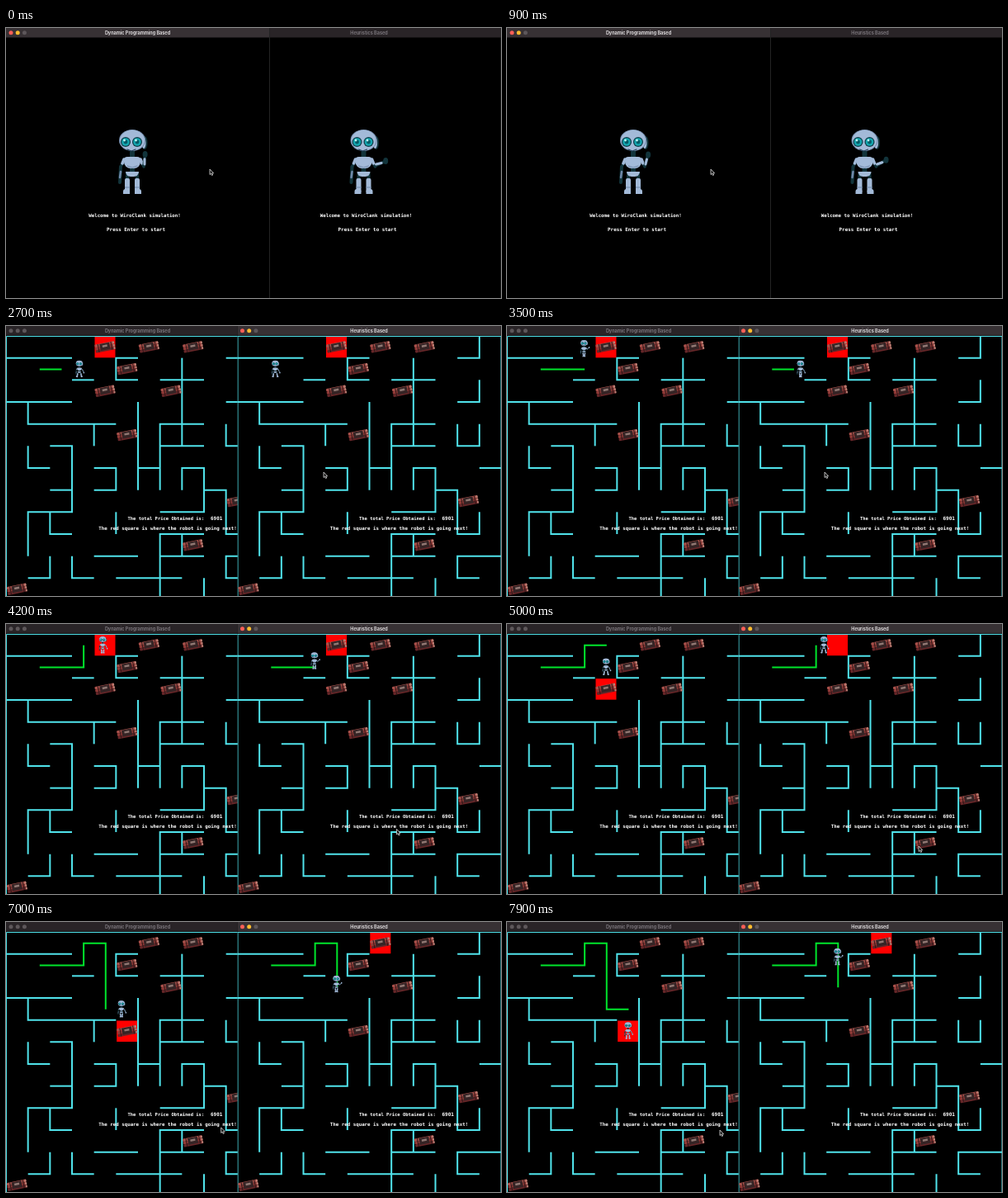
These frames come from a looping animation (600x327 px, 8000 ms). An HTML page with a canvas:

```html
<!DOCTYPE html>
<html lang="en">
<head>
<meta charset="utf-8">
<title>Maze robots</title>
<style>
html, body { margin: 0; width: 100%; height: 100%; overflow: hidden; background: #000 }
canvas { display: block }
</style>
</head>
<body>
<canvas id="stage" width="600" height="327"></canvas>
<script>
const c = document.getElementById('stage').getContext('2d');
const LOOP = 8000, CELL = 80 / 3, TOP = 12, FOCUS = 2300;
const MONO = '"DejaVu Sans Mono", monospace';
const STEP = { R: [1, 0], L: [-1, 0], D: [0, 1], U: [0, -1] };

// Walls as a start corner and the turns taken from it
const walls = `0,1 RRR; 0,3 RRR; 1,3 DRRRR; 4,4 D; 6,1 LDR; 3,2 R; 8,1 DDDD; 7,2 RR;
  10,1 RU; 10,3 RU; 10,4 DRU; 6,3 DDDD; 9,4 LLDDD; 6,6 R; 7,5 RR; 2,5 RDDDLLDD;
  2,7 R; 1,5 DR; 4,6 RDL; 8,7 URDDLL; 9,7 RDDRU; 11,6 R; 5,8 D; 2,8 DR; 9,9 LLDDD;
  8,9 D; 4,10 RR; 7,10 RR; 1,11 RU; 3,10 DR; 5,11 RRR; 9,11 D; 12,10 LLDR`.split(';').map(walk);
const bombs = '4,0 6,0 8,0 5,1 4,2 7,2 5,4 10,7 8,9 0,11'.split(' ');

const bots = [
  { x: 0, title: 'Dynamic Programming Based', start: 1688, wave: .55, route: walk('1,1 RRURDDDRD') },
  { x: 280.5, title: 'Heuristics Based', start: 2540, wave: 0, route: walk('1,1 RRURDDUURR') }
];
for (const b of bots) {
  const visits = b.route.map(String);
  b.stops = visits.map((_, i) => i)
    .filter(i => bombs.includes(visits[i]) && visits.indexOf(visits[i]) === i);
}
const pointer = [[0, 247, 171], [1950, 385, 177], [3750, 499, 269], [5150, 301, 203], [6450, 258, 252]];

const mid = n => (n + .5) * CELL;
const mix = (a, b, f) => a + (b - a) * f;
const clamp = (v, lo, hi) => Math.min(hi, Math.max(lo, v));

function walk(s) {
  const [start, moves] = s.trim().split(' ');
  const path = [start.split(',').map(Number)];
  for (const m of moves) path.push(path.at(-1).map((v, i) => v + STEP[m][i]));
  return path;
}

// Cells travelled; a bot runs faster while it is the only one
function progress(b, t) {
  const alone = Math.max(0, Math.min(t, bots[1].start) - b.start);
  return clamp((1.375 * (t - b.start) + .515 * alone) / 1000, 0, b.route.length - 1.001);
}

function line(color, width, points) {
  c.strokeStyle = color;
  c.lineWidth = width;
  c.beginPath();
  for (const [x, y] of points) c.lineTo(x, y);
  c.stroke();
}

function oval(color, x, y, rx, ry = rx) {
  c.fillStyle = color;
  c.beginPath();
  c.ellipse(x, y, rx, ry, 0, 0, 7);
  c.fill();
}

function box(color, x, y, w, h, r = 0) {
  c.fillStyle = color;
  c.beginPath();
  c.roundRect(x, y, w, h, r);
  c.fill();
}

function text(s, x, y, size, align = 'center', color = '#fff', family = MONO) {
  c.font = `bold ${size}px ${family}`;
  c.fillStyle = color;
  c.textAlign = align;
  c.fillText(s, x, y);
}

function robot(x, y, scale, angle, stride = 0) {
  const skin = '#a3bad8', shade = '#7089aa', dark = '#12343b';
  c.save();
  c.translate(x, y);
  c.scale(scale, scale);
  c.lineCap = c.lineJoin = 'round';
  for (const side of [-1, 1]) {
    c.save();
    c.translate(side * 6, 14);
    c.rotate(side * stride);
    line(dark, 4, [[0, 0], [0, 10]]);
    box(skin, -3, 6, 6, 18, 2);
    box(skin, -4 + side, 19, 8, 6, [3, 3, 0, 0]);
    line(shade, 1, [[-3, 17], [3, 17]]);
    c.restore();
    line(dark, 3.5, [[side * 9, -3], [side * 14, 6]]);
    line(skin, 3.5, [[side * 10, -3], [side * 12, 2]]);
  }
  line(dark, 4, [[-14, 6], [-15, 25]]);
  line(shade, 2.5, [[-14, 12], [-15, 19]]);
  const hx = 14 + 14 * Math.sin(angle), hy = 5 - 14 * Math.cos(angle);
  line(dark, 3.5, [[14, 5], [hx, hy]]);
  line(skin, 3, [[15, 3], [mix(14, hx, .6), mix(5, hy, .6)]]);
  oval(scale < 1 ? skin : dark, hx, hy, 3, 4);
  line(dark, 6, [[0, -14], [0, 14]]);
  box(skin, -10, -6, 20, 14, [4, 4, 8, 8]);
  line(shade, 1, [[-6, 5], [0, 7], [6, 5]]);
  box(skin, -8, 12, 16, 6, [0, 0, 8, 8]);
  oval(dark, 15, -23, 3.5, 8);
  oval(skin, 14, -23, 2.5, 7);
  oval(shade, 0, -26, 16, 13);
  oval(skin, 0, -26, 15, 12.5);
  for (const ex of [-8, 6]) {
    oval('#113a46', ex, -24, 6);
    oval('#13a6af', ex, -24, 4.8);
    oval('#075966', ex, -24, 2.4);
    oval('#b9f6f4', ex - 1.5, -26, 1.4);
  }
  line('#243d55', 1.2, [[-6, -15], [-1, -13], [4, -15]]);
  c.restore();
}

function bomb(x, y) {
  c.save();
  c.translate(x, y);
  c.rotate(-.2);
  ['#a8504a', '#913a37', '#662628'].forEach((color, i) => {
    box(color, -12, -5 + i * 3.4, 24, 3.4, 1);
    oval('#bd8579', 11, -3.3 + i * 3.4, 1, 1.5);
  });
  box('#352425', -6, -4.5, 12, 8);
  box('#8f7772', -3, -2.5, 6, 2.5);
  for (const side of [-8, 8]) line('#2b1718', 1, [[side, -5], [side, 5]]);
  c.restore();
}

function maze(b, t) {
  const p = progress(b, t), n = Math.floor(p), f = p - n;
  const center = ([x, y]) => [mid(x), TOP + mid(y)];
  const goal = center(b.route[b.stops.find(i => i > p)]);
  box('#f00', goal[0] - 12.5, goal[1] - 12.5, 25, 25.5);
  const cyan = '#50e3eb';
  c.lineCap = 'butt';
  line(cyan, 1, [[.5, 327], [.5, 12.5], [319.5, 12.5], [319.5, 327]]);
  for (const w of walls) line(cyan, 2, w.map(([x, y]) => [x * CELL, TOP + y * CELL]));
  const taken = b.stops.filter(i => p >= i - 1).map(i => String(b.route[i]));
  for (const s of bombs) if (!taken.includes(s)) bomb(...center(s.split(',').map(Number)));
  line('#00e52c', 2, b.route.slice(0, n + 1).map(center).map(([x, y]) => [x + .8, y + .5]));
  const from = center(b.route[n]), to = center(b.route[n + 1]);
  robot(mix(from[0], to[0], f), mix(from[1], to[1], f), .26,
    to[1] < from[1] ? .8 : 2.6, .2 * Math.sin(t / 90));
  text('The total Price Obtained is:', 147.5, 235, 5.5, 'left');
  text('6901', 248, 235, 6, 'left');
  text('The red square is where the robot is going next!', 196, 247, 5.8);
}

function welcome(b, t) {
  const turn = Math.cos(2 * Math.PI * (t / 820 + b.wave));
  robot(153, 162, 1, (35 + 30 * turn) * Math.PI / 180);
  text('Welcome to WiroClank simulation!', 156, 228.5, 5.8);
  text('Press Enter to start', 157.5, 245.5, 5.9);
}

function pane(b, t, active) {
  c.save();
  c.translate(b.x, 0);
  c.beginPath();
  c.rect(0, 0, 320, 327);
  c.clip();
  box('#000', 0, 0, 320, 327);
  (t < b.start ? welcome : maze)(b, t);
  box(active ? '#373134' : '#292427', 0, 0, 320, 11.5);
  ['#ff5f57', '#febc2e', '#5d575a'].forEach((color, i) =>
    oval(active ? color : '#5d575a', 6 + i * 8.2, 5.8, 2.5));
  text(b.title, 159.5, 7.8, 5.5, 'center', active ? '#dedbdd' : '#79747a', 'Inter, sans-serif');
  line('#232323', 1, [[319.5, 0], [319.5, t < b.start ? 327 : 12]]);
  c.restore();
}

function cursor(t) {
  let [, x, y] = pointer[0];
  for (const [start, px, py] of pointer) {
    const f = clamp((t - start) / 650, 0, 1), ease = f * f * (3 - 2 * f);
    x = mix(x, px, ease);
    y = mix(y, py, ease);
  }
  c.save();
  c.translate(x, y);
  const arrow = new Path2D('M0 0V6.5L1.5 5.2L2.6 7.6L3.7 7L2.7 4.8H4.6Z');
  c.fillStyle = '#111';
  c.fill(arrow);
  c.strokeStyle = '#ddd';
  c.lineWidth = .8;
  c.stroke(arrow);
  c.restore();
}

function draw(t) {
  const top = t < FOCUS ? 0 : 1;
  pane(bots[1 - top], t, false);
  pane(bots[top], t, true);
  cursor(t);
}

const begin = performance.now();
function tick() {
  draw((performance.now() - begin) % LOOP);
  requestAnimationFrame(tick);
}
tick();
</script>
</body>
</html>
```
